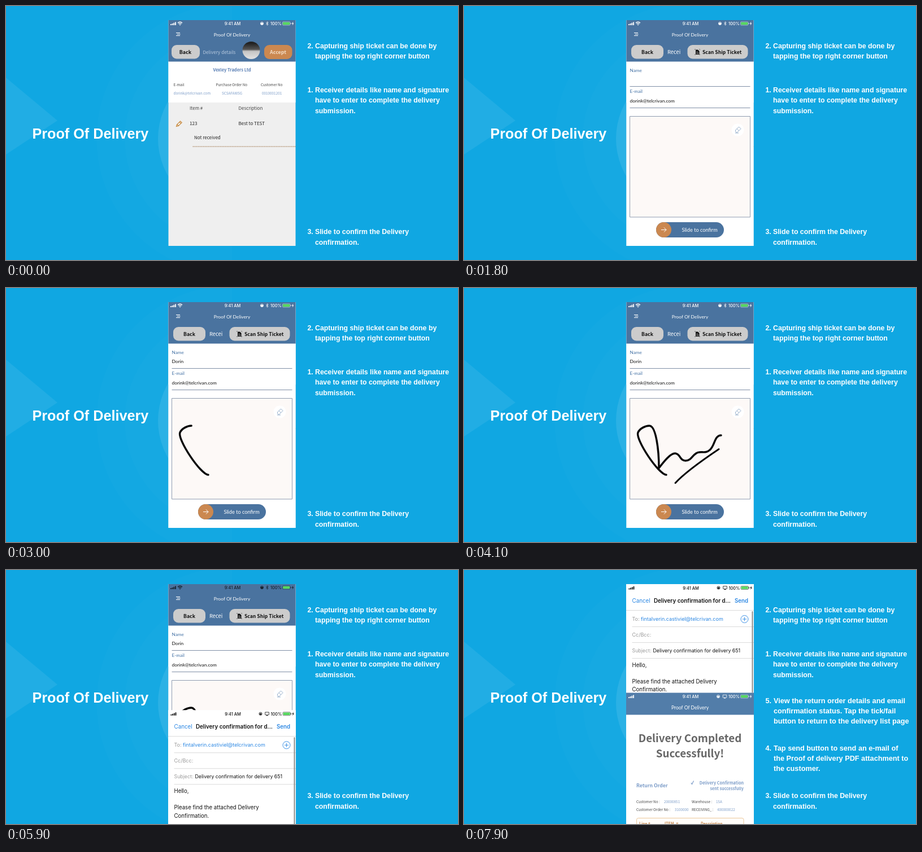
Recreate the animation shown at these times as an HTML page. Size 800 by 450 pixels, loop 8 s.

```html
<!DOCTYPE html>
<html lang="en">
<head>
<meta charset="utf-8">
<title>Proof Of Delivery</title>
<style>
html, body { margin: 0; width: 100%; height: 100%; overflow: hidden; background: #10a7e2; }
svg { display: block; width: 100%; height: 100%; }
text { white-space: pre; }
.notes, .head { font-family: "Liberation Sans", Arial, sans-serif; font-weight: 700; fill: #fff; }
.app { font-family: "Noto Sans CJK JP", "Noto Sans CJK SC", "Noto Sans CJK", "Noto Sans", sans-serif; font-size: 8px; fill: #444; }
.lato { font-family: Lato, sans-serif; font-size: 8.4px; }
.mail, .bar { font-family: Inter, Roboto, sans-serif; }
.mail { font-size: 9px; fill: #111; }
.bar { font-size: 7.4px; font-weight: 500; fill: currentColor; }
.small { font-size: 6.35px; }
.b { font-weight: 700; }
.mid { text-anchor: middle; }
.end { text-anchor: end; }
.blue { fill: #7c9cc8; }
.link { fill: #2b87e3; }
.dim { fill: #9a9a9a; }
.white { fill: #fff; }
.line { fill: none; stroke: currentColor; }
</style>
</head>
<body>
<svg viewBox="0 0 800 450">
  <defs>
    <linearGradient id="photo" x2="0" y2="1">
      <stop offset=".1" stop-color="#222"/><stop offset=".45" stop-color="#555"/>
      <stop offset=".55" stop-color="#c4c4c4"/><stop offset="1" stop-color="#e2e2e2"/>
    </linearGradient>
    <clipPath id="left"><path d="M0 0h400v450H0z"/></clipPath>
    <g id="status" class="bar">
      <path d="M291 32h1.8v2h-1.8zM293.7 31h1.8v3h-1.8zM296.4 29.8h1.8v4.2h-1.8zM299.1 28.5h1.8v5.5h-1.8z"/>
      <text class="mid" x="401" y="34">9:41 AM</text>
      <text x="468" y="34">100%</text>
      <rect class="line" x="489.4" y="28" width="13.6" height="6" rx="1.5" stroke-width=".5"/>
      <rect x="490.2" y="28.8" width="12" height="4.4" rx=".8" fill="#57d860"/>
      <path d="M503.6 30h.9v2h-.9zM508.4 27.5l-2.6 4h1.6l-.7 3 2.7-4h-1.7z"/>
    </g>
    <g id="lock">
      <circle class="line" cy="31" r="2.6" stroke-width=".8"/>
      <path d="M-1.3 30.4h2.6v2h-2.6z" fill="currentColor"/>
    </g>
    <g id="wifi" class="line" stroke-width="1.3">
      <path d="M304 30q4-3.600 8 0M305.600 31.900q2.400-2 4.800 0M307.200 33.500h1.600"/>
      <path d="M460.400 29.400l3.800 3.200-2 1.600v-6.400l2 1.600-3.800 3.200" stroke-width=".7"/>
      <use href="#lock" x="453"/>
    </g>
    <g id="cast" class="line" stroke-width=".8">
      <path d="M460 32.800h-1.800v-4.600h6.600v4.600H463"/><path d="M461.500 32l2 2.400h-4z" fill="currentColor" stroke="none"/>
      <use href="#lock" x="450"/>
    </g>
    <g id="top">
      <path fill="#4a739f" d="M287.500 25h225v73.500h-225z"/>
      <path stroke="#fff" d="M301 47.500h7M302.500 50h6M301 52.500h7"/>
      <text class="lato mid white" x="400" y="53.600" font-size="8.600">Proof Of Delivery</text>
    </g>
  </defs>

  <rect width="800" height="450" fill="#10a7e2"/>
  <g fill="#fff" clip-path="url(#left)">
    <path d="M0 127L91 203 0 263z" fill-opacity=".07"/>
    <circle cx="400" cy="235" r="240" fill-opacity=".01"/>
    <circle cx="400" cy="235" r="190" fill-opacity=".012"/>
    <circle cx="400" cy="235" r="131" fill-opacity=".09"/>
  </g>
  <text class="head" x="46.500" y="234.500" font-size="25.200">Proof Of Delivery</text>
  <g id="notes" class="notes"></g>

  <g class="app">
    <g id="list">
      <path fill="#efefef" d="M287.500 25h225v400h-225z"/>
      <path fill="#fff" d="M287.500 98h225v73h-225z"/>
      <use href="#top"/>
      <g color="#fff"><use href="#status"/><use href="#wifi"/></g>
      <rect x="293" y="69" width="50" height="24.500" rx="9" fill="#ccc"/>
      <text class="b mid" x="317.500" y="84.800" font-size="8.900" fill="#111">Back</text>
      <text x="348.500" y="84.800" style="font-size:8.100px" fill="#b9cbe0">Delivery details</text>
      <circle cx="434" cy="78.500" r="15.500" fill="url(#photo)"/>
      <rect x="457" y="69" width="49.500" height="25" rx="9" fill="#cb8850"/>
      <text class="b mid" x="481.500" y="85" font-size="8.900" fill="#f3dcc4">Accept</text>
      <text class="b mid" x="400" y="115.800" style="font-size:7.500px" fill="#5a7fb5">Vexley Traders Ltd</text>
      <g class="small">
        <text x="296.500" y="141.500">E-mail</text>
        <text x="371.500" y="141.500">Purchase Order No</text>
        <text x="451" y="141.500">Customer No</text>
        <text class="blue" x="296.500" y="157">dorink@telcrivan.com</text>
        <text class="blue" x="382" y="157">SCSAFAWSG</text>
        <text class="blue" x="453" y="157">0010001201</text>
      </g>
      <text x="325" y="184">Item #</text>
      <text x="411.500" y="184">Description</text>
      <g fill="#222">
        <text x="325" y="211">123</text>
        <text x="411.500" y="211">Best to TEST</text>
        <text x="333" y="235.500">Not received</text>
      </g>
      <path fill="none" stroke="#c98a3c" stroke-width="1.200" d="M301.500 213.500l1-3.500 6-6 2.700 2.500-6 6zM303 210l2.500 2.500M307 205.500l2.700 2.500"/>
      <path stroke="#a0764e" stroke-dasharray="2 1" d="M330.500 249h182"/>
    </g>

    <g id="form">
      <path fill="#fff" d="M287.500 25h225v400h-225z"/>
      <use href="#top"/>
      <g id="formBar"><use href="#status"/><use href="#wifi"/></g>
      <rect x="296" y="69" width="57" height="24.500" rx="9" fill="#ccc"/>
      <text class="b mid" x="324.500" y="84.800" font-size="8.700" fill="#111">Back</text>
      <text class="white" x="360" y="85" style="font-size:9.400px">Recei</text>
      <rect x="395.500" y="69" width="107" height="24.500" rx="9" fill="#ccc"/>
      <path fill="#111" d="M410 77.500h4l2.500 2.500v6H410z"/>
      <path fill="none" stroke="#555" stroke-width=".6" d="M408.500 78v-1.500h1.500M416 76.500h1.500V78M408.500 85v1.500h1.500M416 86.500h1.500V85"/>
      <path stroke="#ccc" stroke-width=".6" d="M411 81h3M411 82.800h4.500M411 84.500h4.500"/>
      <text class="b" x="422" y="84.800" font-size="8.600" fill="#111">Scan Ship Ticket</text>
      <g class="lato">
        <text x="293.500" y="117" fill="#4472a5" font-size="8.200">Name</text>
        <text id="name" x="293.500" y="133.300" fill="#111"></text>
        <text x="293.500" y="154" fill="#4472a5" font-size="8.200">E-mail</text>
        <text x="293.500" y="171" fill="#111">dorink@telcrivan.com</text>
      </g>
      <path stroke="#7f8ea6" d="M293.500 142.500h213M293.500 180.500h213"/>
      <path fill="#fdf9f7" stroke="#8e9cb0" d="M293.500 195.500h213v178.500h-213z"/>
      <circle cx="484.500" cy="219.500" r="11" fill="#fff"/>
      <path fill="none" stroke="#7b9abd" stroke-width=".8" d="M480.500 220l6-6 3.500 3.500-6.500 6.500h-1.500l-1.500-1.500zM483 217.500l3.500 3.500M480 225h6"/>
      <g fill="none" stroke="#080808" stroke-width="3.500" stroke-linecap="round" stroke-linejoin="round">
        <path id="sign" pathLength="1" d="M358 331C344 330 303 268 308 256C311 249 321 244 328 244C340 244 345 288 345 319C354 307 366 292 374 293C383 294 382 306 392 306C404 306 405 292 416 291C423 290 428 293 435 287C444 280 443 261 455 261"/>
        <path id="under" pathLength="1" stroke-width="3" d="M374 345.500C390 328 425 303 451 285.500"/>
      </g>
      <rect x="340" y="383" width="120" height="27" rx="13.500" fill="#4a739f"/>
      <text id="hint" class="lato white" x="385.500" y="399.800" style="font-size:9.200px">Slide to confirm</text>
      <g id="knob">
        <circle cx="353.500" cy="396.500" r="13.500" fill="#cb8850"/>
        <path fill="none" stroke="#fff" d="M349 396.500h9M354 392.500l4 4-4 4"/>
      </g>
    </g>
  </g>

  <g id="mail" class="mail">
    <path fill="#fff" d="M287 25h226v401h-226z"/>
    <g color="#111" transform="translate(.5 .5)"><use href="#status"/><use href="#cast"/></g>
    <text class="link" x="297.500" y="58" font-size="9.800">Cancel</text>
    <text x="336" y="58" font-size="9.800" font-weight="600">Delivery confirmation for d...</text>
    <text class="link" x="479" y="58" font-size="9.700" font-weight="600">Send</text>
    <path stroke="#d2d2d2" stroke-width=".8" d="M287 71.500h226M297.500 100.500H513M297.500 128.500H513M297.500 156.500H513"/>
    <text class="dim" x="297.500" y="89.500">To:</text>
    <text class="link" x="313" y="89.500">fintalverin.castiviel@telcrivan.com</text>
    <path class="line" color="#2b87e3" stroke-width=".9" d="M503 87a6.500 6.500 0 1 1-13 0a6.500 6.500 0 1 1 13 0M493 87h7M496.500 83.500v7"/>
    <text class="dim" x="297.500" y="117.500">Cc/Bcc:</text>
    <text class="dim" x="297.500" y="145.800" font-size="8.800">Subject:</text>
    <text x="334.500" y="145.800" font-size="8.750">Delivery confirmation for delivery 651</text>
    <g font-size="9.650">
      <text x="297.500" y="172">Hello,</text>
      <text x="297.500" y="201">Please find the attached Delivery</text>
      <text x="297.500" y="215.300">Confirmation.</text>
      <text x="297.500" y="258.500">Sent from my Zalune</text>
    </g>
    <path stroke="#8c8c8c" stroke-width="2" stroke-linecap="round" d="M510.500 74v300"/>
  </g>

  <g id="done" class="app">
    <path fill="#fff" d="M287 25h226v401h-226z"/>
    <path fill="#527da9" d="M287 25h226v39h-226z"/>
    <g color="#fff" transform="translate(0 .5)"><use href="#status"/><use href="#cast"/></g>
    <text class="lato mid white" x="400" y="54" style="font-size:8.600px">Proof Of Delivery</text>
    <g class="b mid" font-size="18.800" fill="#666">
      <text x="400" y="112">Delivery Completed</text>
      <text x="400" y="139">Successfully!</text>
    </g>
    <g class="b blue">
      <text x="305" y="192" font-size="8.600">Return Order</text>
      <g class="end" font-size="7.200">
        <text x="495" y="187">Delivery Confirmation</text>
        <text x="495" y="197.500">sent successfully</text>
      </g>
    </g>
    <path fill="none" stroke="#7c9cc8" stroke-width="1.200" d="M402 184.500l1.500 2.500 3-6"/>
    <g class="small">
      <text x="305" y="220.500">Customer No :</text><text class="blue" x="354" y="220.500">20000851</text>
      <text x="403" y="220.500">Warehouse :</text><text class="blue" x="446" y="220.500">15A</text>
      <text x="305" y="234.500">Customer Order No :</text><text class="blue" x="373" y="234.500">3100000</text>
      <text x="403" y="234.500">RECEIVING_ :</text><text class="blue" x="448" y="234.500">400000022</text>
    </g>
    <rect x="305.500" y="247" width="189.500" height="80" rx="3" fill="#fffdf9" stroke="#ecc79a"/>
    <g class="b" font-size="6.800" fill="#c98a50">
      <text x="310" y="259.500">Line #</text>
      <text x="355" y="259.500">ITEM_#</text>
      <text x="419" y="259.500">Description</text>
    </g>
  </g>
</svg>
<script>
const $ = id => document.getElementById(id);
const set = (id, key, value) => $(id).setAttribute(key, value);

function note(id, size, x, y, step, lines) {
  const rows = lines.map((s, i) => `<text x="${x}" y="${y + i * step}">${s}</text>`).join("");
  $("notes").innerHTML +=
    `<g id="note${id}" font-size="${size}"><text x="533.5" y="${y}">${id}.</text>${rows}</g>`;
}
note(2, 12.3, 547, 74.5, 18.7, ["Capturing ship ticket can be done by", "tapping the top right corner button"]);
note(1, 12.3, 547, 152.5, 18.7, ["Receiver details like name and signature", "have to enter to complete the delivery", "submission."]);
note(5, 12.7, 548, 236, 18, ["View the return order details and email", "confirmation status. Tap the tick/fail", "button to return to the delivery list page"]);
note(4, 12.7, 548, 320, 18, ["Tap send button to send an e-mail of", "the Proof of delivery PDF attachment to", "the customer."]);
note(3, 12.3, 547, 404, 18.7, ["Slide to confirm the Delivery", "confirmation."]);

const LOOP = 8000, STEP = 100, NAME = "Dorin";
const span = (t, from, to) => Math.min(1, Math.max(0, (t - from) / (to - from)));
const smooth = u => u * u * (3 - 2 * u);

function show(id, on) {
  set(id, "visibility", on ? "visible" : "hidden");
}
function stroke(id, p) {
  show(id, p > 0);
  set(id, "stroke-dasharray", `${p} 1.1`);
}
function rise(id, t, start) {
  const e = smooth(span(t, start, start + 830));
  show(id, e > 0);
  set(id, "transform", `translate(0 ${425 * (1 - e)})`);
}

function draw(t) {
  set("form", "opacity", smooth(span(t, 0, 1000)));
  $("name").textContent = NAME.slice(0, Math.round(NAME.length * span(t, 1800, 2500)));

  const u = span(t, 2700, 3700);
  stroke("sign", u * (1.2 - 0.2 * u));
  stroke("under", span(t, 3900, 4100));

  const slide = smooth(span(t, 4650, 5200));
  set("knob", "transform", `translate(${92.5 * slide})`);
  set("hint", "opacity", 1 - slide);
  set("formBar", "color", t < 5500 ? "#fff" : "#15202c");

  rise("mail", t, 5499);
  rise("done", t, 7459);
  set("note4", "opacity", span(t, 5950, 6350));
  set("note5", "opacity", span(t, 7150, 7500));
}

let start;
function tick(now) {
  start ??= now;
  draw(Math.floor((now - start) % LOOP / STEP) * STEP);
  requestAnimationFrame(tick);
}
draw(0);
requestAnimationFrame(tick);
</script>
</body>
</html>
```
